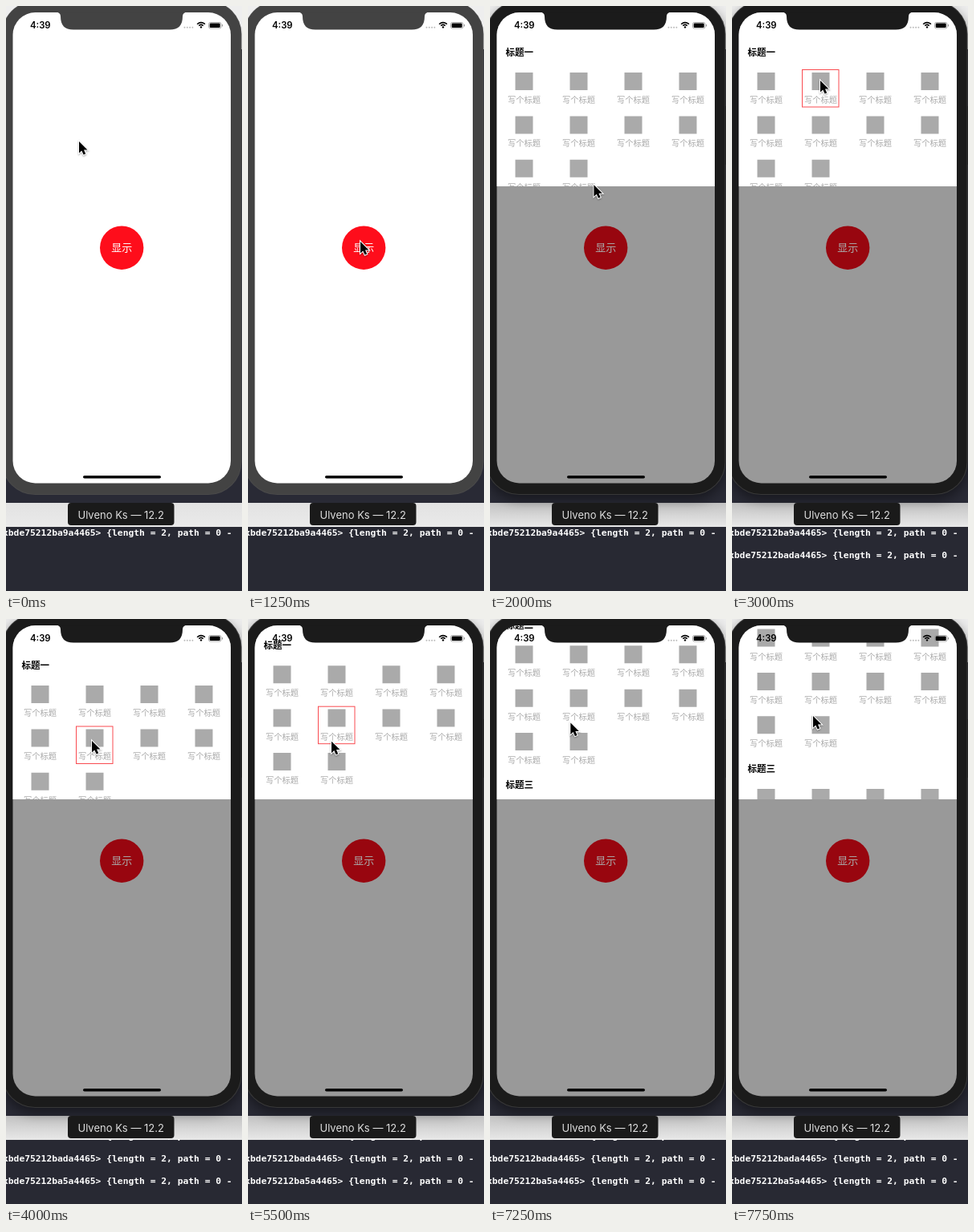
An HTML page with a canvas for the animation above (8 s loop, 294x730 px).

```html
<!DOCTYPE html>
<html lang="zh">
<head>
<meta charset="utf-8">
<style>
html, body { margin: 0; width: 100%; height: 100%; overflow: hidden; background: #282933; }
canvas { display: block; }
</style>
</head>
<body>
<canvas id="stage" width="294" height="730"></canvas>
<script>
const ctx = document.getElementById('stage').getContext('2d');
const LOOP = 8000, STEP = 250;
const SANS = 'Inter, Roboto, sans-serif';
const CJK = '"Noto Sans CJK SC", "Noto Sans CJK", sans-serif';
const MONO = '"DejaVu Sans Mono", monospace';
const SECTION = 199.5, ROW = 54.4, COLUMN = 68;

// Keyframes: [time, value, value, ...]
const cursorKeys = [
  [0, 91, 169], [1250, 140, 294], [1500, 140, 294], [2750, 110, 93],
  [3250, 110, 93], [3750, 107, 152], [5000, 107, 152],
  [6250, 98.5, 154], [7750, 101, 121]
];
const scrollKeys = [[0, 0], [5000, 0], [6250, 70.5], [7500, 270]];
const panelKeys = [[0, -217], [1250, -217], [1500, -150], [1750, 0]];

function sample(keys, t) {
  const next = keys.findIndex(k => k[0] > t);
  if (next < 0) return keys[keys.length - 1].slice(1);
  const a = keys[next - 1], b = keys[next];
  let p = (t - a[0]) / (b[0] - a[0]);
  p = p * p * (3 - 2 * p);
  return a.slice(1).map((v, i) => v + (b[i + 1] - v) * p);
}

function box(x, y, w, h, color, radius = 0) {
  ctx.fillStyle = color;
  ctx.beginPath();
  ctx.roundRect(x, y, w, h, radius);
  ctx.fill();
}

function text(str, x, y, font, color, align = 'left') {
  ctx.font = font;
  ctx.fillStyle = color;
  ctx.textAlign = align;
  ctx.fillText(str, x, y);
}

function clipped(x, y, w, h, radius, draw) {
  ctx.save();
  ctx.beginPath();
  ctx.roundRect(x, y, w, h, radius);
  ctx.clip();
  draw();
  ctx.restore();
}

function drawBackdrop(active) {
  box(0, 0, 294, 730, '#292a35');
  box(0, 0, 294, 54, '#eeeeee');
  const strip = ctx.createLinearGradient(0, 620, 0, 650);
  strip.addColorStop(0, active ? '#c3c3c3' : '#e2e2e2');
  strip.addColorStop(1, active ? '#e8e8e8' : '#eaeaea');
  box(0, 620, 294, 30, strip);
}

function drawConsole(t) {
  const ids = ['ba9a', 'bada', 'ba5a'];
  const count = t < 2750 ? 1 : t < 4000 ? 2 : 3;
  const shift = count === 3 ? 12 : 0;
  clipped(0, 649, 294, 81, 0, () => {
    box(0, 650, 294, 80, '#282933');
    ids.slice(0, count).forEach((id, i) =>
      text(`xbde75212${id}4465> {length = 2, path = 0 -`, -4, 661 + i * 28 - shift,
        `bold 11.3px ${MONO}`, '#fff'));
  });
}

function drawPanel(t) {
  const [drop] = sample(panelKeys, t), [scroll] = sample(scrollKeys, t);
  clipped(8, 8, 273, 217 + drop, 0, () => {
    box(8, 8, 273, 217, '#fff');
    ctx.translate(0, drop - scroll);
    ['一', '二', '三', '四'].forEach((number, s) => {
      const top = s * SECTION;
      text('标题' + number, 19.5, top + 61.5, `bold 11.5px ${CJK}`, '#000');
      for (let i = 0; i < 10; i++) {
        const x = 42.5 + (i % 4) * COLUMN, y = top + 83 + Math.floor(i / 4) * ROW;
        box(x - 11, y, 22, 22, '#aaa');
        text('写个标题', x, y + 38, `10.3px ${CJK}`, '#aaa', 'center');
      }
    });
    if (t >= 2750) {
      ctx.strokeStyle = '#f94b50';
      ctx.lineWidth = 1;
      ctx.strokeRect(87.5, t < 4000 ? 79.5 : 134, 45.5, 46.5);
    }
  });
}

function drawStatus() {
  text('4:39', 30, 28, `600 11.3px ${SANS}`, '#000');
  for (let i = 0; i < 4; i++) box(221.5 + i * 3.3, 25.8, 2, 2, '#bbb', 1);
  ctx.strokeStyle = '#000';
  ctx.lineWidth = 1.6;
  for (const r of [3.6, 6.4]) {
    ctx.beginPath();
    ctx.arc(243, 27, r, -Math.PI * 0.77, -Math.PI * 0.23);
    ctx.stroke();
  }
  box(241.8, 25.2, 2.4, 2.4, '#000', 1.2);
  ctx.strokeStyle = '#999';
  ctx.lineWidth = 0.8;
  ctx.beginPath();
  ctx.roundRect(252.5, 20.5, 15.5, 7.5, 2);
  ctx.stroke();
  box(253.7, 21.6, 13, 5.3, '#000', 1.2);
  box(269, 23, 1, 2.6, '#999');
}

function drawNotch(color) {
  ctx.fillStyle = color;
  ctx.fill(new Path2D(
    'M62 7.5H226Q220 8 220 13C220 24 215 29.5 204 29.5H84C73 29.5 68 24 68 13Q68 8 62 7.5Z'));
}

function drawPhone(t, active) {
  const bezel = active ? '#1b1b1b' : '#434343';
  box(291, 125, 4, 73, active ? '#111' : '#2b2b2b');
  ctx.save();
  if (active) {
    ctx.shadowColor = 'rgba(0,0,0,.45)';
    ctx.shadowBlur = 16;
    ctx.shadowOffsetY = 6;
  }
  box(-5, -6, 298.5, 616, active ? '#383838' : '#4a4a4a', 41);
  ctx.restore();
  box(-4, -5, 296.5, 614, bezel, 40);
  clipped(8.5, 8, 271.5, 587.5, 28, () => {
    box(8, 8, 273, 588, active ? '#999' : '#fff');
    box(117, 274.5, 54.4, 54.4, active ? '#98060f' : '#fe0d1b', 27.2);
    text('显示', 144.2, 306.3, `13px ${CJK}`, active ? '#aaa' : '#fff', 'center');
    if (active) drawPanel(t);
    drawStatus();
    box(96, 586, 97, 3.6, '#000', 1.8);
  });
  drawNotch(bezel);
}

function drawCursor(t) {
  const [x, y] = sample(cursorKeys, t);
  ctx.save();
  ctx.translate(x, y);
  const arrow = new Path2D('M0 0V14.5L3.3 11.4L5.6 16.6L8.2 15.5L6 10.4H10.5Z');
  ctx.shadowColor = 'rgba(0,0,0,.35)';
  ctx.shadowBlur = 2;
  ctx.shadowOffsetY = 1;
  ctx.strokeStyle = '#fff';
  ctx.lineWidth = 2;
  ctx.stroke(arrow);
  ctx.shadowColor = 'transparent';
  ctx.fillStyle = '#000';
  ctx.fill(arrow);
  ctx.restore();
}

function render(now) {
  const t = Math.floor((now % LOOP) / STEP) * STEP;
  const active = t >= 1500;
  drawBackdrop(active);
  drawPhone(t, active);
  drawConsole(t);
  box(77, 620, 132.5, 28, '#1a1a1a', 4);
  text('Ulveno Ks — 12.2', 143.2, 639.5, `13px ${SANS}`, '#dedede', 'center');
  drawCursor(t);
  requestAnimationFrame(render);
}
requestAnimationFrame(render);
</script>
</body>
</html>
```
